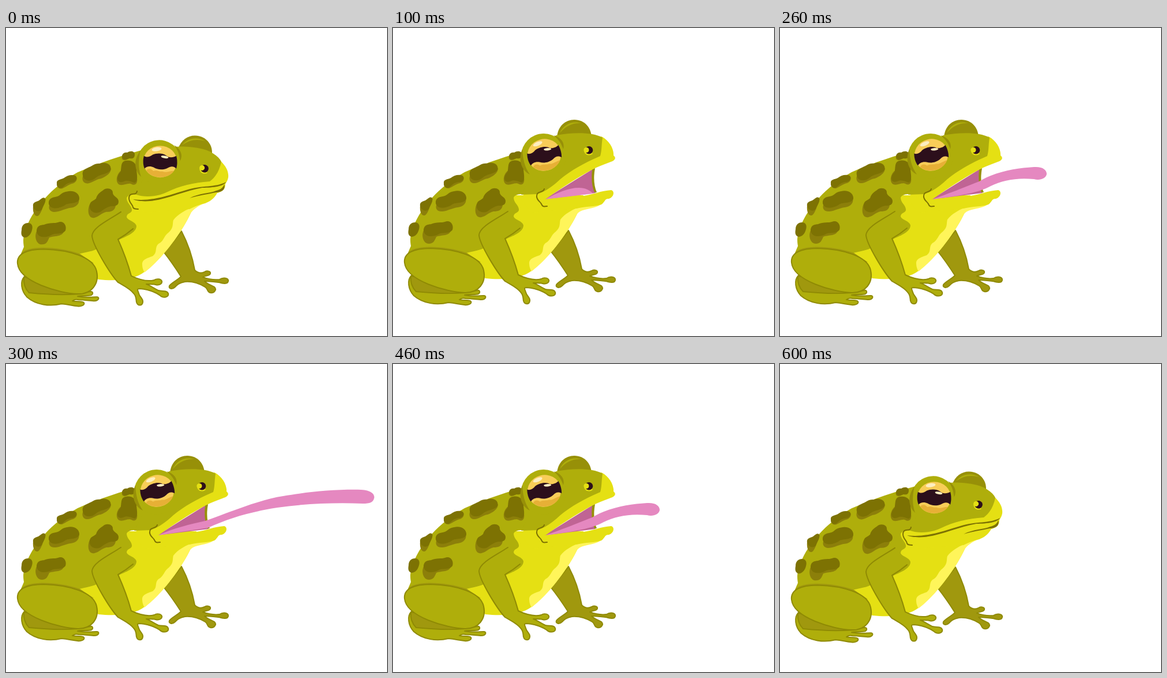
Write an HTML page that moves like this. It is 660 px wide and 534 px high and loops after 700 ms.

```html
<!DOCTYPE html>
<html lang="en">
<head>
<meta charset="utf-8">
<title>Frog</title>
<style>
  html, body { margin: 0; width: 100%; height: 100%; overflow: hidden; background: #fff; }
  svg { display: block; }
  .skin { fill: #afae0b; }
  .shade { fill: #a0980e; }
  .dark { fill: #979008; }
  .yellow { fill: #e5e013; }
  .light { fill: #fff55a; }
  .spot { fill: #7d7203; }
  .rim { fill: #8c7f0a; }
  .pupil { fill: #2c0f1b; }
  .glint { fill: #fdeec0; }
  .tongue { fill: #e588c0; }
  .limb { stroke: #8f8a04; stroke-width: 2; stroke-linejoin: round; }
  .line { fill: none; stroke: #7d7203; stroke-width: 2; stroke-linecap: round; }
</style>
</head>
<body>
<svg width="660" height="534" viewBox="0 0 660 534">
  <defs>
    <g id="farEye">
      <path class="dark" d="M284 190C285 170 299 159 314 159C332 159 345 173 344 194L300 200Z"/>
      <path class="skin" d="M289 182C295 167 311 160 326 165C311 164 299 170 289 182Z"/>
    </g>
    <g id="face">
      <circle class="skin" cx="261" cy="222" r="39"/>
      <path class="dark" d="M224 210C216 230 223 247 237 254C228 241 225 228 224 210Z"/>
      <path class="dark" d="M278 186C292 190 298 200 295 210C291 200 288 194 278 186Z"/>
      <g transform="rotate(-15 262 220) translate(-5 -12)">
        <ellipse cx="267" cy="232" rx="29.3" ry="27.5" fill="#f8cd58"/>
        <path fill="#e7b036" d="M243 247C247 243 252 244 255 248C261 246 266 250 271 249C277 252 283 248 291 248C281 263 253 263 243 247Z"/>
        <path class="pupil" d="M239 222C243 225 249 224 254 220C261 217 271 217 277 221C282 226 290 225 295 222C297 229 297 237 295 244C290 239 285 240 280 243C272 247 262 246 256 242C250 239 243 240 240 244C237 237 237 229 239 222Z"/>
        <ellipse class="glint" cx="261" cy="210.5" rx="8.5" ry="3.4" transform="rotate(-8 261 210.5)"/>
        <ellipse class="glint" cx="275" cy="224" rx="6.5" ry="2.2" transform="rotate(10 275 224)"/>
      </g>
      <path class="yellow" d="M331 209C329 219 339 224 346 218L339 209Z"/>
      <circle class="pupil" cx="339.5" cy="211.7" r="6.8"/>
      <circle class="yellow" cx="335" cy="211.5" r="4.5"/>
    </g>
  </defs>

  <g id="body">
    <path class="shade limb" d="M274 388L304 351C314 370 323 395 327 418C332 423 338 424 344 421C348 418 355 420 354 424C353 428 347 427 341 430C352 434 362 435 370 434C376 430 386 431 385 437C384 443 375 441 369 439C360 438 352 437 344 437C350 443 356 444 361 447C366 452 360 458 354 457C348 456 350 450 345 447C335 441 322 437 310 438C300 440 297 443 293 447C288 452 281 450 283 445C286 440 296 436 303 429C292 412 282 398 274 388Z"/>
    <path class="yellow" d="M120 386L200 290L330 290L320 320C304 354 271 398 240 421C225 433 195 438 160 434L130 410Z"/>
    <path class="light" d="M318 312C308 317 298 322 290 332C288 338 291 345 282 353C273 359 274 368 264 373C257 379 263 388 254 394C247 397 235 399 236 409C236 414 238 419 240 422C271 398 304 354 320 320Z"/>
    <path class="skin" d="M238 211C203 220 160 234 124 250C83 273 50 308 36 343C28 362 30 371 31 378L25 392L120 392C140 386 152 386 160 380L196 366C205 361 226 355 226 342C224 334 211 333 209 327C209 319 219 321 218 314C217 306 209 303 209 294C211 289 218 288 224 288L258 289L275 212Z"/>

    <path class="rim" d="M54 350C48 358 52 374 62 374C70 374 72 369 75 362C85 358 97 362 101 350Z"/>
    <path class="rim" d="M145 305C140 316 143 330 153 328C162 326 165 320 174 318C182 318 189 316 190 307Z"/>
    <path class="rim" d="M76 305C72 312 76 319 86 318C95 317 103 312 112 311C122 310 128 303 126 296Z"/>
    <path class="rim" d="M134 255C130 262 134 270 142 269C150 268 156 262 164 261C172 258 182 252 182 243Z"/>
    <path class="rim" d="M198 248C190 256 190 268 196 271C204 274 212 266 219 271C226 273 228 267 227 260Z"/>
    <path class="rim" d="M89 265C86 272 90 279 97 278C104 275 110 270 116 269C122 267 124 261 122 258Z"/>
    <path class="rim" d="M47 308C46 318 49 326 55 325C61 322 64 308 69 296Z"/>
    <path class="rim" d="M202 220C198 228 204 231 210 228Z"/>

    <path class="spot" d="M27 349C27 341 32 337 38 337C45 337 47 343 45 349C43 357 38 362 32 362C26 360 26 355 27 349Z"/>
    <path class="spot" d="M47 309C46 302 50 301 56 299C61 296 64 291 68 295C70 302 63 309 62 314C56 320 49 315 47 309Z"/>
    <path class="spot" d="M88 270C87 262 94 263 100 260C106 255 112 254 118 255C126 257 122 267 114 267C106 268 103 271 98 276C92 279 88 275 88 270Z"/>
    <path class="spot" d="M74 304C73 295 80 293 86 292C95 291 95 284 106 283C118 280 128 287 127 296C125 304 112 302 104 305C95 312 77 316 74 304Z"/>
    <path class="spot" d="M133 255C131 246 138 244 144 241C150 239 153 234 163 235C172 231 184 236 181 246C176 254 164 252 156 259C148 267 134 266 133 255Z"/>
    <path class="spot" d="M198 250C201 244 197 231 208 230C218 228 226 234 226 243C226 252 230 264 223 268C216 266 210 262 203 266C192 270 190 258 198 250Z"/>
    <path class="spot" d="M201 223C201 218 205 215 210 216C216 212 223 214 223 219C223 226 219 227 214 226C208 229 202 229 201 223Z"/>
    <path class="spot" d="M145 306C146 299 152 299 156 295C158 288 163 284 168 281C174 275 186 278 185 286C186 292 195 293 195 300C195 308 188 308 183 308C176 309 170 313 165 317C156 323 143 318 145 306Z"/>
    <path class="spot" d="M53 352C53 341 60 341 66 340C75 336 85 338 90 336C99 332 106 341 103 350C97 358 85 353 78 358C70 362 56 364 53 352Z"/>

    <path class="shade" d="M25 393C28 376 85 375 128 390L152 406L60 392Z"/>
    <path class="skin limb" d="M32 429C24 437 26 453 36 464C52 478 76 481 96 476C108 477 114 479 124 480C130 481 137 478 135 474C133 471 126 473 115 471C118 469 120 468 126 469C135 469 148 471 153 471C161 471 163 464 157 464C150 464 140 466 124 463C134 461 143 463 148 461C152 458 150 454 146 455L125 458Z"/>
    <path class="shade limb" d="M31 430C30 440 33 450 40 457C60 459 90 462 124 459L90 440Z"/>
    <path class="skin limb" d="M20 407C18 390 36 382 65 382C110 383 152 396 157 420C162 442 148 459 125 459C92 458 23 438 20 407Z"/>
    <path class="skin limb" stroke-linecap="round" d="M199 318C180 331 150 344 149 359C150 375 180 424 194 439C204 445 215 450 221 458C226 463 225 467 226 473C228 480 236 480 237 473C238 467 231 464 230 458C228 452 226 450 232 450C244 451 257 455 266 461C272 467 283 465 281 458C279 452 270 455 264 453C256 449 249 444 243 442C250 442 255 442 259 443C266 445 271 441 270 437C268 432 260 433 257 435C246 438 230 434 217 428C211 406 203 385 194 365C203 360 213 353 220 347"/>
  </g>

  <g id="closed">
    <use href="#farEye" transform="translate(7 13) rotate(15 262 220)"/>
    <path class="light" d="M316 313L350 298L343 304C332 309 325 314 319 322Z"/>
    <path class="yellow" d="M212 290L372 231C382 240 386 250 385 259C384 265 381 268 380 271C380 280 374 284 366 286C360 297 352 301 345 304C335 306 326 310 318 314L240 320Z"/>
    <path class="skin" d="M232 214L290 206C315 204 345 208 358 217C366 222 371 227 373 232C370 246 364 258 353 266C325 268 300 274 280 284C262 293 240 294 226 289L218 288L238 262Z"/>
    <use href="#face" transform="translate(5 11.7) rotate(15 262 220)"/>
    <path class="spot" d="M220 297C250 302 285 289 312 281C340 272 362 277 381 267C378 274 360 277 340 277C310 282 280 297 250 300C238 301 226 300 220 297Z"/>
    <path class="spot" d="M318 295C335 286 352 287 364 282C372 280 376 277 378 271C381 280 373 285 364 285C350 288 335 290 318 295Z"/>
    <path class="line" d="M227 283C226 292 213 283 213 295C213 303 219 305 220 311C222 315 225 313 229 314"/>
  </g>

  <g id="open">
    <use href="#farEye"/>
    <path fill="#c06494" d="M262 297L347 244C343 258 345 275 351 286Z"/>
    <path class="dark" d="M350 243C347 258 348 274 353 285L349 285C343 270 344 256 345 245Z"/>
    <path class="tongue" id="tongue"/>
    <path class="light" d="M316 313L367 297C363 308 350 311 341 313C332 315 325 316 319 322Z"/>
    <path class="yellow" d="M215 290L264 297L330 291C346 289 360 282 378 281C385 283 382 294 374 296C366 296 368 301 361 306C350 310 334 309 318 313L240 320Z"/>
    <path class="yellow" d="M225 290L361 188C375 195 383 210 382 221C386 224 386 228 380 231C368 236 355 240 346 245C320 259 288 280 264 297Z"/>
    <path class="skin" d="M232 212L283 186C310 181 345 180 363 190C361 202 362 212 359 222C340 230 310 245 290 262C276 275 263 284 250 288L222 289L236 262Z"/>
    <use href="#face"/>
    <path class="line" d="M262 279C260 287 248 281 249 293C250 300 257 302 258 307C260 311 263 309 267 309"/>
  </g>
</svg>
<script>
  const $ = id => document.getElementById(id);
  const STEP = 100;
  const poses = [0, 1, 2, 3, 2, 1, 0];
  const tongues = [
    "",
    "M264 297C285 285 305 277 322 277C333 277 340 281 347 287Z",
    "M264 297C290 288 320 276 345 266C375 248 410 243 440 241C455 240 462 246 462 253C461 261 450 265 440 262C410 259 385 264 365 274C350 282 330 289 264 297Z",
    "M264 297C290 284 320 278 345 272C390 256 440 235 480 229C520 222 570 217 615 218C632 219 638 225 638 231C637 240 630 242 618 242C570 240 520 242 470 249C420 257 385 268 350 284Z"
  ];

  function draw(now) {
    const pose = poses[Math.floor(now / STEP) % poses.length];
    $("closed").style.display = pose ? "none" : "";
    $("open").style.display = pose ? "" : "none";
    $("tongue").setAttribute("d", tongues[pose]);
    // The body settles slightly when the mouth shuts.
    $("body").setAttribute("transform", pose ? "" : "translate(0 -2) scale(1 1.009)");
  }

  const start = performance.now();
  function tick() {
    draw(performance.now() - start);
    requestAnimationFrame(tick);
  }
  tick();
</script>
</body>
</html>
```
